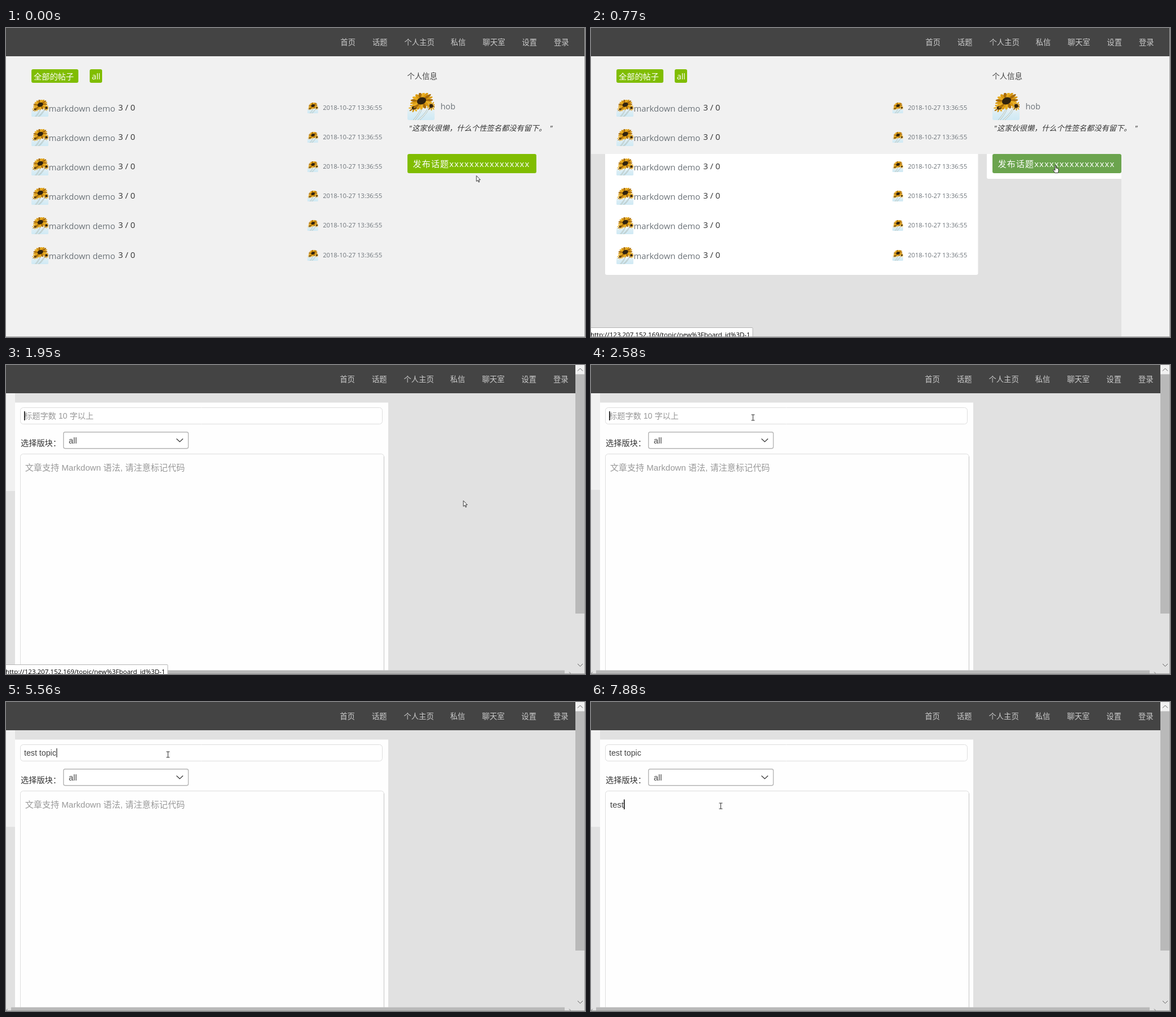
These frames come from a looping animation (1024x547 px, 8 s). An HTML page with a canvas:

```html
<!DOCTYPE html>
<html lang="zh-CN">
<head>
<meta charset="utf-8">
<title>发布话题</title>
<style>
html, body { margin: 0; width: 100%; height: 100%; overflow: hidden; background: #f1f1f1; }
canvas { display: block; width: 1024px; height: 547px; }
</style>
</head>
<body>
<canvas id="stage" width="1024" height="547"></canvas>
<script>
const ctx = document.getElementById('stage').getContext('2d');
const LOOP = 8000, HOVER = 420, FORM = 1630, STATUS_OFF = 2030, BODY_FOCUS = 6570;
const UI = '"Open Sans", "Noto Sans CJK SC", "Noto Sans CJK", sans-serif';
const FIELD = '"Liberation Sans", "Noto Sans CJK SC", "Noto Sans CJK", sans-serif';
const PALE = '#f1f1f1', GRAY = '#e1e1e1', GREEN = '#80bd01', THUMB = '#b9b9b9', MUTED = '#6c7379';
const titleKeys = [3300, 3380, 3550, 3640, 4180, 4550, 4640, 4790, 5030, 5190];
const bodyKeys = [7340, 7550, 7810, 7880];

function rect(x, y, w, h, color) {
  ctx.fillStyle = color;
  ctx.fillRect(x, y, w, h);
}

function roundRect(x, y, w, h, r, fill, border, lineWidth = 1) {
  ctx.beginPath();
  ctx.roundRect(x, y, w, h, r);
  if (fill) { ctx.fillStyle = fill; ctx.fill(); }
  if (border) { ctx.strokeStyle = border; ctx.lineWidth = lineWidth; ctx.stroke(); }
}

function text(str, x, y, size, color, family = UI, style = '') {
  ctx.font = `${style} ${size}px ${family}`;
  ctx.fillStyle = color;
  ctx.fillText(str, x, y);
}

function line(points, color, width) {
  ctx.beginPath();
  points.forEach(([x, y]) => ctx.lineTo(x, y));
  ctx.strokeStyle = color;
  ctx.lineWidth = width;
  ctx.stroke();
}

// Discrete progress: 1/n at time a, 1 at time b.
function steps(t, a, b, n) {
  if (t < a) return 0;
  return Math.min(n, Math.floor((t - a) / (b - a) * (n - 1) + 1e-6) + 1) / n;
}

const ease = p => p * p * (3 - 2 * p);
const mix = (a, b, p) => a + (b - a) * p;

function flower(cx, cy, r, petals, squash) {
  ctx.save();
  ctx.translate(cx, cy);
  ctx.rotate(-0.35);
  ctx.scale(1, squash);
  for (let i = 0; i < petals; i++) {
    ctx.save();
    ctx.rotate(i / petals * Math.PI * 2);
    ctx.beginPath();
    ctx.ellipse(r * 0.66, 0, r * 0.38, r * 0.15, 0, 0, 7);
    ctx.fillStyle = ['#d99a12', '#a96c0a', '#e9ae22'][i % 3];
    ctx.fill();
    ctx.restore();
  }
  ctx.beginPath();
  ctx.arc(0, 0, r * 0.42, 0, 7);
  ctx.fillStyle = '#30230f';
  ctx.fill();
  ctx.restore();
}

// Sunflower picture on a 48-unit square.
function avatar(x, y, size) {
  ctx.save();
  ctx.translate(x, y);
  ctx.scale(size / 48, size / 48);
  ctx.beginPath();
  ctx.roundRect(0, 0, 48, 48, 3);
  ctx.clip();
  const sky = ctx.createLinearGradient(0, 26, 0, 48);
  sky.addColorStop(0, 'rgba(212,236,246,0)');
  sky.addColorStop(0.5, '#d9edf5');
  sky.addColorStop(1, '#cfe9f4');
  rect(0, 26, 48, 22, sky);
  for (const [x0, x1] of [[26, 11], [38, 19]]) {
    ctx.beginPath();
    ctx.moveTo(x0, 24);
    ctx.quadraticCurveTo(x0 - 2, 34, x1, 49);
    ctx.strokeStyle = '#9fb4b4';
    ctx.lineWidth = 3;
    ctx.stroke();
    ctx.strokeStyle = '#eef5f2';
    ctx.lineWidth = 1.5;
    ctx.stroke();
  }
  flower(12, 26, 10, 9, 0.75);
  flower(42, 23, 8, 10, 1);
  flower(25, 14, 20, 17, 0.72);
  ctx.restore();
}

function nav(width, shift) {
  rect(0, 0, width, 50, '#444');
  const items = [['首页', 591.5], ['话题', 648], ['个人主页', 704.5], ['私信', 786.5],
    ['聊天室', 843], ['设置', 912.5], ['登录', 969]];
  for (const [label, x] of items) text(label, x - shift, 30, 13.3, '#ccc');
}

function statusBar() {
  roundRect(-2, 530.5, 288, 20, 1, '#fff', '#b4b4b4');
  text('http://123.207.152.169/topic/new%3Fboard_id%3D-1', -1, 547, 11.5, '#000');
}

function listPage(hover) {
  rect(0, 0, 1024, 547, PALE);
  if (hover) {
    ctx.save();
    ctx.beginPath();
    ctx.rect(0, 223, 938, 324);
    ctx.clip();
    rect(0, 223, 938, 324, GRAY);
    roundRect(25, 100, 659.5, 337, 3, '#fff');
    roundRect(700, 100, 300, 167, 3, '#fff');
    ctx.restore();
  }
  nav(1024, 0);

  roundRect(45, 73, 83, 24, 3, GREEN);
  text('全部的帖子', 49, 91, 14.2, '#fff');
  roundRect(148, 73, 22, 24, 3, GREEN);
  text('all', 151.7, 91, 14.4, '#fff');

  for (let i = 0; i < 6; i++) {
    const y = Math.round(i * 52.1);
    avatar(45, 127 + y, 30);
    text('markdown demo', 75.5, 148 + y, 14.8, MUTED);
    text('3 / 0', 198.5, 146 + y, 14.8, '#333');
    avatar(533, 132 + y, 19);
    text('2018-10-27 13:36:55', 560.5, 145 + y, 11.1, MUTED);
  }

  text('个人信息', 709.5, 90, 13.3, '#444');
  avatar(710, 115, 48);
  text('hob', 768.5, 144, 14.4, MUTED);
  text('"', 712.5, 182, 13.3, '#333', UI, 'italic');
  text('这家伙很懒，什么个性签名都没有留下。', 718, 182, 13.2, '#333', UI, 'italic');
  text('"', 961.5, 182, 13.3, '#333', UI, 'italic');

  roundRect(710, 223, 228, 34, 3, hover ? '#6ba44e' : GREEN);
  ctx.letterSpacing = '1px';
  text('发布话题xxxxxxxxxxxxxxxx', 719.5, 246, 15.1, '#fff');
  ctx.letterSpacing = '0px';

  if (hover) statusBar();
  rect(0, 546, 1024, 1, '#a0a0a0');
  rect(1023, 0, 1, 547, '#a0a0a0');
}

function scrollBars() {
  rect(1007, 0, 17, 547, GRAY);
  rect(1007, 0, 17, 16, PALE);
  rect(1007, 16.5, 16, 423.5, THUMB);
  line([[1011, 10.5], [1015.5, 6], [1020, 10.5]], '#606060', 1);
  line([[1011, 529], [1015.5, 533.5], [1020, 529]], '#606060', 1);
  rect(0, 540.5, 1007, 7, GRAY);
  rect(9, 540.5, 979, 6, THUMB);
  line([[3, 543.5], [0.5, 546]], '#707070', 1);
  line([[996, 543.5], [998.5, 546]], '#707070', 1);
  rect(0, 546, 1024, 1, '#a0a0a0');
  rect(1023, 0, 1, 547, '#a0a0a0');
}

const typed = (keys, t) => keys.filter(k => k <= t).length;

function caretAlpha(t) {
  const last = Math.max(...[FORM, BODY_FOCUS, ...titleKeys, ...bodyKeys].filter(k => k <= t));
  const phase = (t - last) % 1000;
  return phase >= 930 ? 1 : 1 - steps(phase, 370, 520, 3);
}

// Shows typed text or its placeholder, with the caret when focused.
function field(value, hint, x, y, size, focused, top, height, alpha) {
  text(value || hint, x, y, size, value ? '#444' : '#999', FIELD);
  if (!focused) return;
  const end = x + ctx.measureText(value).width;
  ctx.globalAlpha = alpha;
  rect(Math.round(end), top, 1.5, height, '#000');
  ctx.globalAlpha = 1;
}

function formPage(t) {
  rect(0, 0, 1024, 547, GRAY);
  rect(0, 50, 16, t < STATUS_OFF ? 173 : 171, PALE);
  rect(16, 66.5, 660, 480, '#fefefe');
  nav(1007, 1);

  roundRect(25.5, 75.5, 640, 29, 5, '#fff', '#ddd');
  text('选择版块：', 26, 142.5, 14.2, '#333');
  roundRect(101.7, 118.7, 220.8, 29, 3, '#fff', '#b5b5b5', 1.4);
  text('all', 111, 138.5, 14.4, '#444', FIELD);
  line([[301.5, 130.5], [307.3, 136], [313, 130.5]], '#333', 1.2);
  roundRect(25.5, 157.5, 643, 420, 5, '#fefefe', '#ddd');
  line([[668.5, 162], [668.5, 541]], '#c4c4c4', 1);

  const inBody = t >= BODY_FOCUS, alpha = caretAlpha(t);
  field('test topic'.slice(0, typed(titleKeys, t)), '标题字数 10 字以上',
    32, 95, 14.2, !inBody, 82, 16, alpha);
  field('test'.slice(0, typed(bodyKeys, t)), '文章支持 Markdown 语法, 请注意标记代码',
    33.7, 187, 15.1, inBody, 172.5, 17.5, alpha);

  scrollBars();
  if (t < STATUS_OFF) statusBar();
}

function shape(x, y, points) {
  ctx.beginPath();
  points.forEach(([px, py]) => ctx.lineTo(x + px, y + py));
  ctx.closePath();
  ctx.fillStyle = '#fff';
  ctx.fill();
  ctx.strokeStyle = '#222';
  ctx.lineWidth = 0.9;
  ctx.stroke();
}

function arrow(x, y) {
  shape(x, y, [[0, 0], [0, 10], [2.3, 8], [4, 11.5], [5.4, 10.9], [3.9, 7.4], [7, 7.2]]);
}

function hand(x, y) {
  shape(x, y, [[0, 0.5], [1.5, 0.5], [1.7, 5], [5.5, 6], [6, 10], [4.8, 13.5], [-0.5, 13.5],
    [-3.6, 8.8], [-2.8, 7.6], [-0.3, 9]]);
}

function iBeam(x, y) {
  x += 0.5;
  line([[x, y - 5], [x, y + 5]], '#333', 1);
  for (const dy of [-5, 5]) line([[x - 3, y + dy], [x + 3, y + dy]], '#333', 1);
}

function pointer(t) {
  if (t < FORM) {
    const p = steps(t, HOVER, 770, 4);
    if (p === 0) arrow(832, 261.5);
    else hand(mix(831, 821, p), mix(258, 243, p));
    return;
  }
  const p = ease(steps(t, 1880, 2580, 10)), q = ease(steps(t, 6120, 6410, 5));
  const x = mix(mix(824, 286, p), 229, q), y = mix(mix(244.5, 93, p), 184, q);
  const overText = (x < 668 && y > 157) || (x < 665 && y < 105);
  (overText ? iBeam : arrow)(x, y);
}

function draw(now) {
  const t = now % LOOP;
  if (t < FORM) listPage(t >= HOVER);
  else formPage(t);
  pointer(t);
  requestAnimationFrame(draw);
}
requestAnimationFrame(draw);
</script>
</body>
</html>
```
